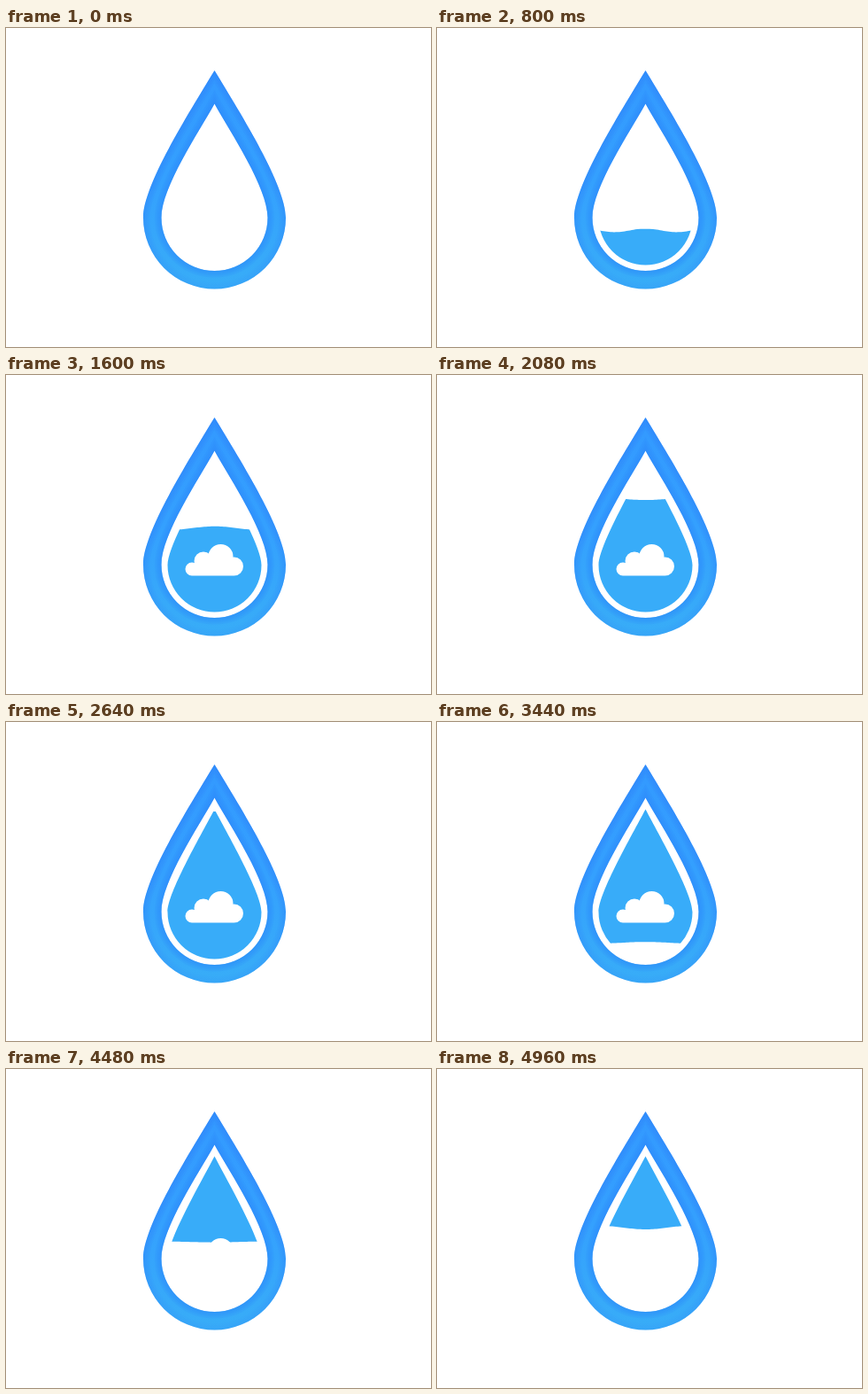
An HTML page with a canvas for the animation above (5040 ms loop, 480 by 360 pixels).

```html
<!DOCTYPE html>
<html lang="en">
<head>
<meta charset="utf-8">
<title>Water drop</title>
<style>
html, body { margin: 0; width: 100%; height: 100%; overflow: hidden; background: #fff; }
canvas { display: block; }
</style>
</head>
<body>
<canvas id="stage" width="480" height="360"></canvas>
<script>
const ctx = document.getElementById("stage").getContext("2d");
const LOOP = 5040, STEP = 80, CX = 235.5;

// Symmetric drop: pointed tip, two curved flanks, round belly.
function drop(tip, nearX, nearY, farY, radius, belly) {
  const p = new Path2D();
  p.moveTo(CX, tip);
  p.bezierCurveTo(CX + nearX, nearY, CX + radius, farY, CX + radius, belly);
  p.arc(CX, belly, radius, 0, Math.PI);
  p.bezierCurveTo(CX - radius, farY, CX - nearX, nearY, CX, tip);
  p.closePath();
  return p;
}

const outer = drop(48, 31, 99, 178, 80.5, 214);
const inner = drop(85.5, 18, 118, 180, 60, 214);
const water = drop(98.5, 15.5, 128, 193, 53, 214.5);
const ring = new Path2D(outer);
ring.addPath(inner);

function vertical(y0, y1, ...colors) {
  const g = ctx.createLinearGradient(0, y0, 0, y1);
  colors.forEach((c, i) => g.addColorStop(i / (colors.length - 1), c));
  return g;
}

const ringFill = vertical(48, 295, "#3399ff", "#34a0fe", "#38adf7");
const innerShade = "rgba(45,125,248,.15)";
const outerShade = vertical(60, 295, "rgba(45,125,248,.15)", "rgba(45,125,248,.14)", "rgba(45,125,248,.04)");

function shadeEdge(path, style) {
  ctx.strokeStyle = style;
  for (const width of [3, 7, 11, 15]) {
    ctx.lineWidth = width;
    ctx.stroke(path);
  }
}

function drawRing() {
  ctx.save();
  ctx.clip(ring, "evenodd");
  ctx.fillStyle = ringFill;
  ctx.fillRect(150, 40, 172, 260);
  shadeEdge(outer, outerShade);
  shadeEdge(inner, innerShade);
  ctx.restore();
}

function drawCloud() {
  ctx.fillStyle = "#fff";
  ctx.beginPath();
  for (const [x, y, r] of [[210, 219, 7.5], [223, 210, 10.5], [242.5, 205, 14], [257.5, 216, 10.5]]) {
    ctx.moveTo(x + r, y);
    ctx.arc(x, y, r, 0, 2 * Math.PI);
  }
  ctx.rect(210, 212, 48, 14.5);
  ctx.fill();
}

// Fills the water on one side of a gently rocking surface.
function drawWater(level, swell, wavelength, edge) {
  ctx.save();
  ctx.beginPath();
  ctx.moveTo(180, edge);
  for (let x = 180; x <= 292; x += 2) {
    ctx.lineTo(x, level - swell * Math.cos(2 * Math.PI * (x - CX) / wavelength));
  }
  ctx.lineTo(292, edge);
  ctx.clip();
  ctx.fillStyle = "#38acf9";
  ctx.fill(water);
  ctx.restore();
}

function draw(t) {
  ctx.fillStyle = "#fff";
  ctx.fillRect(0, 0, 480, 360);
  drawRing();
  if (t >= 240 && t < 2900) {
    const level = 268 - 0.0695 * (t - 230);
    drawWater(level, 2 * Math.cos(2 * Math.PI * t / 800), 70 + 0.0375 * Math.max(0, t - 800), 300);
  } else if (t >= 2900) {
    const s = t - 3440;
    const level = 249 - 0.064 * s + 1.18e-5 * s * s;
    drawWater(level, 2 * Math.cos(2 * Math.PI * (t - 3840) / 2240), 100, 80);
  }
  drawCloud();
}

const start = performance.now();
function tick() {
  const t = Math.max(0, performance.now() - start) % LOOP;
  draw(Math.floor(t / STEP) * STEP);
  requestAnimationFrame(tick);
}
tick();
</script>
</body>
</html>
```
